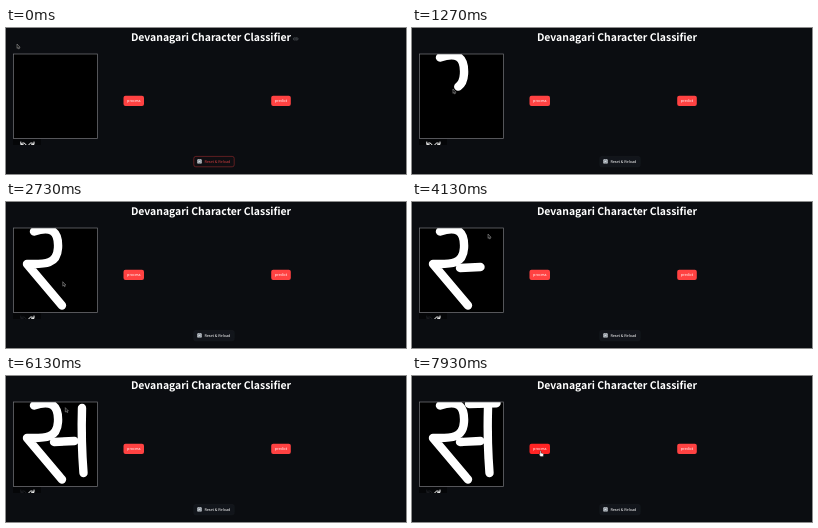
Recreate the animation shown at these times as an HTML page. Size 400 by 146 pixels, loop 8 s.

```html
<!DOCTYPE html>
<html lang="en">
<head>
<meta charset="utf-8">
<title>Devanagari Character Classifier</title>
<style>
  html, body { margin: 0; width: 100%; height: 100%; overflow: hidden; background: #0b0d11; }
  svg { display: block; width: 100vw; height: 100vh; }
  text {
    font: 500 3.75px "Noto Sans CJK JP", "Noto Sans CJK SC", "Noto Sans CJK", "Noto Sans", sans-serif;
    fill: #fff;
    text-rendering: geometricPrecision;
  }
  .title { font-size: 10.42px; font-weight: 700; }
  .mid { text-anchor: middle; }
  .line { fill: none; stroke-linecap: round; stroke-linejoin: round; }
</style>
</head>
<body>
<svg viewBox="0 0 400 146">
  <defs>
    <clipPath id="pad"><rect x="7.5" y="26.2" width="84" height="84"/></clipPath>
    <clipPath id="bar"><rect x="7" y="111" width="28" height="6"/></clipPath>
  </defs>
  <rect width="400" height="146" fill="#0b0d11"/>

  <text class="title mid" x="205" y="13.4">Devanagari Character Classifier</text>
  <path id="link" class="line" stroke="#5c6066" stroke-width=".6"
    d="M289.2 9.8h-.8a1.1 1.1 0 0 0 0 2.2h.8M290.2 9.8h.8a1.1 1.1 0 0 1 0 2.2h-.8M288.8 10.9h1.8"/>

  <rect x="7.5" y="26" width="84" height="84.4" fill="#000" stroke="#77787c" stroke-width=".7"/>
  <g id="ink" class="line" clip-path="url(#pad)" stroke="#fff" stroke-width="8.4"/>

  <g clip-path="url(#bar)">
    <rect x="7" y="111" width="28" height="7" fill="#050608"/>
    <g class="line" stroke="#f4f4f4" stroke-width="1">
      <path id="undo" d="M14.8 114v2.4h2.4M15 116.2q3.2 -3.4 5.4 1.2"/>
      <path d="M28 114v2.4h-2.4M27.8 116.2q-3.2 -3.4 -5.4 1.2"/>
    </g>
  </g>

  <rect id="process" x="117.5" y="67.8" width="20.5" height="10.2" rx="2"/>
  <text class="mid" x="127.8" y="74.1">process</text>
  <rect x="265.2" y="67.8" width="19.6" height="10.2" rx="2" fill="#ff4242"/>
  <text class="mid" x="275" y="74.1">predict</text>

  <rect id="resetBox" x="187.8" y="128.4" width="40.4" height="10.4" rx="2" stroke-width=".6"/>
  <rect x="191.3" y="131.2" width="4.4" height="4.4" rx=".7" fill="#d3d9df"/>
  <path class="line" stroke="#38424d" stroke-width=".5" d="M192.2 133.2a1.3 1.3 0 0 1 2.4 -.5M194.8 133.7a1.3 1.3 0 0 1 -2.4 .5"/>
  <text id="resetText" x="198.4" y="135">Reset &amp; Reload</text>

  <g id="cursor">
    <path id="arrow" d="M0 0V4.4L1 3.6L1.7 5L2.4 4.7L1.8 3.3H3.1Z" fill="#111" stroke="#b4b4b4" stroke-width=".45"/>
    <path id="hand" d="M0 0q.7 -.5 1 .3V2l2 .6q.6 .2 .5 1L3.2 5.6H.6L-1 3.4q.2 -.8 1 0Z" fill="#fff" stroke="#222" stroke-width=".4"/>
  </g>
</svg>
<script>
  const LOOP = 8000, INK_LAG = 70;
  const $ = id => document.getElementById(id);
  const ramp = (t, a, b) => Math.min(1, Math.max(0, (t - a) / (b - a)));
  const smooth = u => u * u * (3 - 2 * u);
  const mix = (a, b, k) => `rgb(${a.map((v, i) => Math.round(v + (b[i] - v) * k))})`;

  function move(start, end, d, inked) {
    const path = document.createElementNS("http://www.w3.org/2000/svg", "path");
    path.setAttribute("d", d);
    if (inked) $("ink").append(path);
    return { start, end, path, inked, length: path.getTotalLength() };
  }
  const glide = (start, end, d) => move(start, end, d, false);
  const draw = (start, end, d) => move(start, end, d, true);

  // The pointer glides with easing, draws at a steady pace and rests between moves.
  const moves = [
    glide(130, 330, "M11 16L28 29"),
    draw(600, 2130, "M28 29.5C44 24 53 28 52 46S36 62 21 62L56 103.5"),
    glide(2530, 2900, "M56 103.5Q60 64 48 66"),
    draw(3270, 3670, "M48 66L68.5 65"),
    glide(3740, 3930, "M68.5 65L76 32"),
    draw(4270, 5000, "M76 32Q75 65 77.5 97"),
    glide(5330, 6270, "M77.5 97Q72 50 57 28"),
    draw(6340, 6940, "M57 28L84.5 27.2"),
    glide(7270, 7930, "M84.5 27.2C105 50 132 100 128 75")
  ];

  function pointer(t) {
    const m = moves.filter(m => m.start <= t).pop() || moves[0];
    const u = ramp(t, m.start, m.end);
    return m.path.getPointAtLength(m.length * (m.inked ? u : smooth(u)));
  }

  function showInk({ start, end, path, length }, t) {
    const drawn = length * ramp(t - INK_LAG, start, end);
    path.setAttribute("visibility", drawn > 0 ? "visible" : "hidden");
    path.setAttribute("stroke-dasharray", `${drawn} ${length + 10}`);
  }

  function render(t) {
    $("link").setAttribute("opacity", 1 - ramp(t, 130, 330));
    moves.filter(m => m.inked).forEach(m => showInk(m, t));
    $("undo").setAttribute("stroke", t < 2530 ? "#f4f4f4" : "#1b1d21");

    const calm = ramp(t, 580, 780);
    $("resetBox").setAttribute("fill", mix([15, 14, 18], [18, 21, 27], calm));
    $("resetBox").setAttribute("stroke", mix([150, 42, 45], [24, 27, 33], calm));
    $("resetText").style.fill = mix([205, 60, 62], [255, 255, 255], calm);

    const hover = ramp(t, 7690, 7850);
    $("process").setAttribute("fill", mix([255, 66, 66], [255, 36, 36], hover));
    $("arrow").setAttribute("visibility", hover ? "hidden" : "visible");
    $("hand").setAttribute("visibility", hover ? "visible" : "hidden");
    const { x, y } = pointer(t);
    $("cursor").setAttribute("transform", `translate(${x} ${y})`);
  }

  const begin = performance.now();
  function tick() {
    render((performance.now() - begin) % LOOP);
    requestAnimationFrame(tick);
  }
  tick();
</script>
</body>
</html>
```
